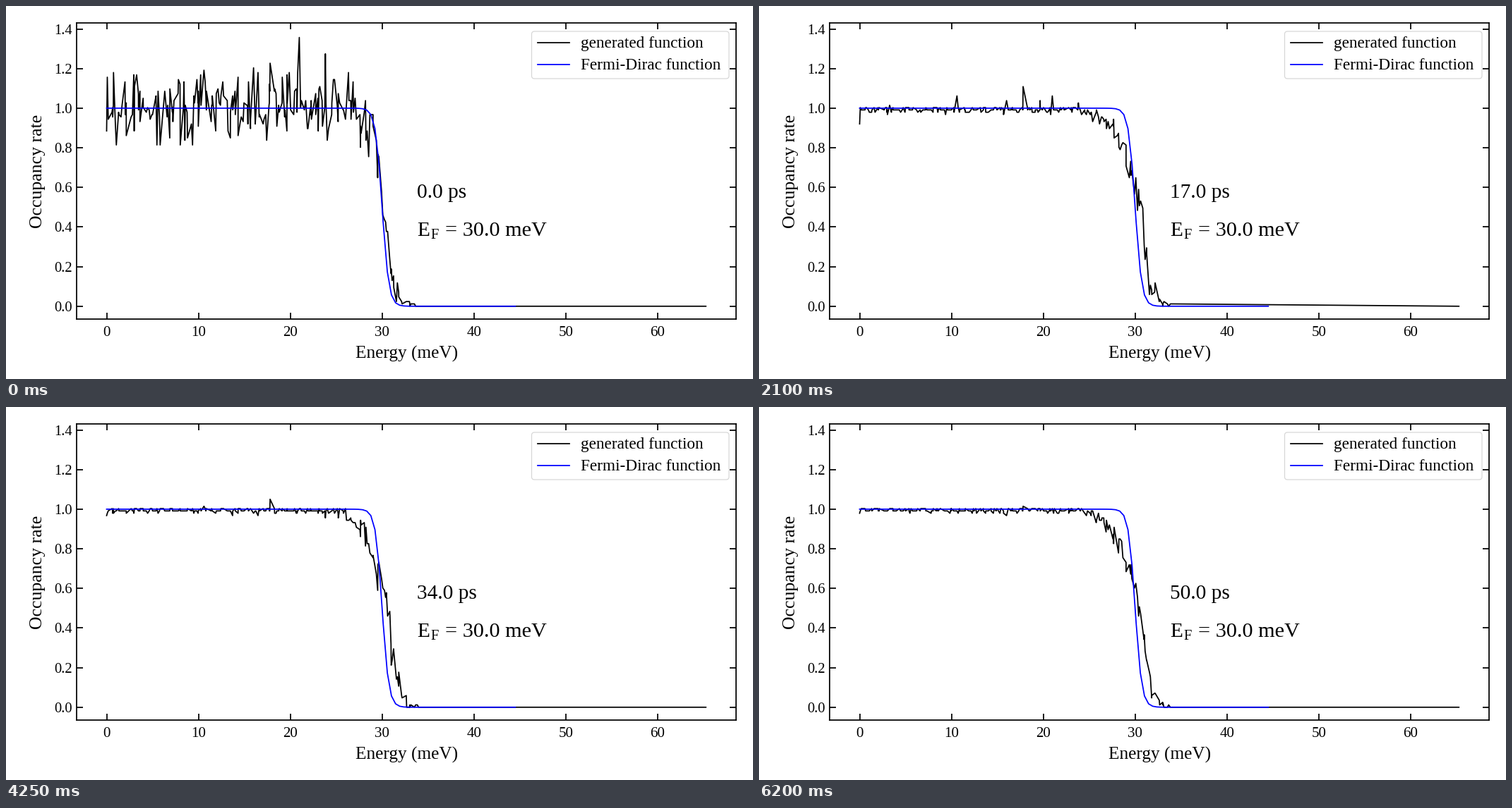
Write a matplotlib script that moves like this. It is 1058x529 px and loops after 6250 ms.

```python
import numpy as np
import matplotlib.pyplot as plt
from matplotlib.animation import FuncAnimation
from matplotlib.patches import FancyBboxPatch

W, H, DPI = 1058, 529, 72          # at 72 dpi one point is one pixel
FRAMES, STEP = 125, 50
LW = 1.75
QUANTUM = 0.0118                   # occupancy per carrier
FULL = 85 * QUANTUM
FADE = 7                           # relaxation in frames

plt.rcParams["font.family"] = "Liberation Serif"
rng = np.random.default_rng(12)

# Slowly relaxing levels: energy, first deviation, lifetime in frames
SLOW = [(0, -0.12, 70), (0.75, 0.178, 20), (3.27, 0.165, 24), (10.6, 0.19, 40),
        (16, 0.20, 25), (17.8, 0.222, 60), (19.65, 0.165, 30), (20.98, 0.362, 28),
        (23.82, 0.27, 20)]


def fermi(e, mu, below, above):
    """Fermi step with its own width on each side of mu."""
    return 1 / (1 + np.exp((e - mu) / np.where(e < mu, below, above)))


def make_levels(spacing=0.3, top=33.8):
    """Sorted energies, first deviations and lifetimes; levels come in close pairs."""
    grid = np.arange(0, top, spacing)
    first = grid + spacing * rng.random(len(grid))
    energy = np.concatenate([first, first + 0.15 * rng.random(len(grid))])
    spread = 0.085 * np.sqrt(fermi(energy, 30.1, 0.6, 0.6))
    dev = spread * np.clip(rng.standard_normal(len(energy)), -2.2, 2.1)
    life = np.full(len(energy), FADE)

    rows = np.vstack([np.column_stack([energy, dev, life]), SLOW, (65.25, 0, FADE)])
    return rows[np.argsort(rows[:, 0])].T


def make_noise(levels, keep=0.75):
    """Noise that fades from frame to frame, one row for each frame."""
    noise = rng.standard_normal((FRAMES, levels))
    for k in range(1, FRAMES):
        noise[k] = keep * noise[k - 1] + np.sqrt(1 - keep ** 2) * noise[k]
    return noise


energy, first_dev, life = make_levels()
noise = make_noise(len(energy))
first_mean = fermi(energy, 30.1, 0.6, 0.6)
last_mean = np.minimum(fermi(energy, 30.6, 1.45, 0.55), 0.994)


def occupancy(k):
    fade = np.exp(-k / FADE)
    mean = last_mean + (first_mean - last_mean) * fade
    mean = mean - 0.014 * (1 - fade) * np.exp(-energy / 6 - k / 40)
    spread = 0.11 * np.sqrt(np.clip(mean * (1 - mean), 0, None)) * (1 - fade)
    y = np.minimum(mean + spread * noise[k], FULL) + first_dev * np.exp(-k / life)
    return np.round(np.clip(y, 0, None) / QUANTUM) * QUANTUM


fig = plt.figure(figsize=(W / DPI, H / DPI), dpi=DPI, facecolor="white")

# Plot area
left, right, top, bottom = 99.5, 1034, 24, 444
x0, y0, sx, sy = 142.5, 425.8, 13.008, 280.9
ax = fig.add_axes([left / W, 1 - bottom / H, (right - left) / W, (bottom - top) / H])
ax.set_xlim((left - x0) / sx, (right - x0) / sx)
ax.set_ylim((y0 - bottom) / sy, (y0 - top) / sy)
xticks = range(0, 61, 10)
yticks = [0.2 * i for i in range(8)]
ax.set_xticks(xticks)
ax.set_yticks(yticks)
ax.tick_params(direction="in", top=True, right=True, length=9, width=LW,
               labelleft=False, labelbottom=False)
for spine in ax.spines.values():
    spine.set_linewidth(LW)

curve, = ax.plot([], [], color="black", lw=LW)
smooth = np.linspace(0, 44.5, 100)
ax.plot(smooth, fermi(smooth, 30, 0.362, 0.362), color="blue", lw=LW)

# Overlay in pixels, y pointing down
px = fig.add_axes([0, 0, 1, 1])
px.set_xlim(0, W)
px.set_ylim(H, 0)
px.axis("off")


def write(x, y, text, size, ha="left", **kw):
    return px.text(x, y, text, fontsize=size, ha=ha, va="baseline", **kw)


for v in xticks:
    write(x0 + v * sx, 467.5, str(v), 21, "center")
for v in yticks:
    write(93.5, y0 - v * sy + 7, f"{v:.1f}", 20.5, "right")
write(567.5, 500, "Energy (meV)", 25.2, "center")
write(51, 234, "Occupancy rate", 25.8, "center", rotation=90, rotation_mode="anchor")

px.add_patch(FancyBboxPatch((744.5, 36), 279.5, 67, boxstyle="round,pad=0,rounding_size=4",
                            fc="white", ec="0.84", lw=1.2))
for y, color, name in [(52, "black", "generated function"),
                       (83, "blue", "Fermi-Dirac function")]:
    px.plot([753, 798], [y, y], color=color, lw=LW)
    write(814.5, y + 7, name, 23.3)

clock = write(582.5, 271.5, "", 29.4)
write(582.5, 326, "E", 29.4)
write(601, 330.5, "F", 20.5)
write(621.5, 326, "= 30.0 meV", 30.3)


def update(k):
    curve.set_data(energy, occupancy(k))
    clock.set_text(f"{-(-2 * k // 5):.1f} ps")
    return curve, clock


anim = FuncAnimation(fig, update, frames=FRAMES, interval=STEP,
                     init_func=lambda: update(0), repeat=True, repeat_delay=0)
plt.show()
```
